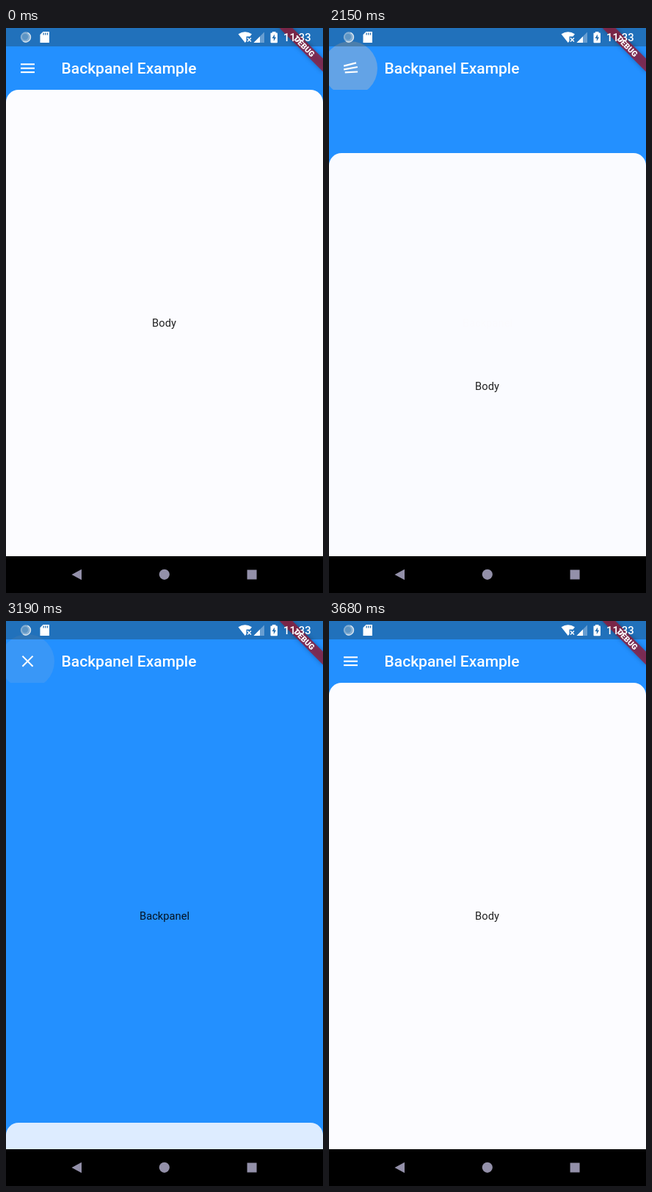
An HTML page with a canvas that plays this animation: 432 by 768 pixels, repeating every 5.7 s.

```html
<!DOCTYPE html>
<html lang="en">
<head>
<meta charset="utf-8">
<title>Backpanel Example</title>
<style>
  html, body { margin: 0; width: 100%; height: 100%; overflow: hidden; background: #000; }
  canvas { display: block; width: 432px; height: 768px; }
</style>
</head>
<body>
<canvas id="stage" width="432" height="768"></canvas>
<script>
const ctx = document.getElementById('stage').getContext('2d');
const W = 432, LOOP = 5700;
const BLUE = '#2390ff', INK = 'rgba(0,0,0,.87)', NAV = '#9390a9';
const TOP = 84, TRAVEL = 598, NAV_TOP = 718;
const OPEN = { ticks: [2020, 2080, 2140, 2190, 2240, 2330, 2420], move: 2054, fade: 2300 };
const CLOSE = { ticks: [3190, 3260, 3330, 3390, 3440, 3540, 3610, 3680], move: 3257, fade: 3530 };
const MOVE_MS = 360;

const clamp = x => Math.min(1, Math.max(0, x));
const ease = x => { x = clamp(x); return x * x * (3 - 2 * x); };

function poly(color, ...pts) {
  ctx.fillStyle = color;
  ctx.beginPath();
  for (let i = 0; i < pts.length; i += 2) ctx.lineTo(pts[i], pts[i + 1]);
  ctx.fill();
}

function disc(color, x, y, r) {
  ctx.fillStyle = color;
  ctx.beginPath();
  ctx.arc(x, y, r, 0, 7);
  ctx.fill();
}

function box(color, x, y, w, h, r = 0) {
  ctx.fillStyle = color;
  ctx.beginPath();
  ctx.roundRect(x, y, w, h, r);
  ctx.fill();
}

function text(str, x, y, size, weight, color, align = 'center') {
  ctx.font = `${weight} ${size}px Roboto, sans-serif`;
  ctx.fillStyle = color;
  ctx.textAlign = align;
  ctx.fillText(str, x, y);
}

function bar(x, y, angle, len, alpha = 1) {
  const dx = Math.cos(angle) * len / 2, dy = Math.sin(angle) * len / 2;
  ctx.strokeStyle = `rgba(255,255,255,${alpha})`;
  ctx.lineWidth = 2.1;
  ctx.beginPath();
  ctx.moveTo(x - dx, y - dy);
  ctx.lineTo(x + dx, y + dy);
  ctx.stroke();
}

// Menu bars turning into a cross.
function menuIcon(p) {
  const cx = 29.5, cy = 54.7, deg = Math.PI / 180;
  const turn = -70 * p * deg, off = 5.4 * (1 - p * p);
  const ox = Math.sin(turn) * off, oy = -Math.cos(turn) * off;
  const len = 19 - 4 * Math.sin(p * Math.PI) + p;
  bar(cx + ox, cy + oy, -45 * Math.pow(p, .6) * deg, len);
  bar(cx, cy, turn, 19, clamp((1 - p) * 2.5));
  bar(cx - ox, cy - oy, -135 * p * p * deg, len);
}

function ripple(t, phase) {
  const start = phase.ticks[0], end = phase.ticks[phase.ticks.length - 1];
  if (t < start || t >= end) return;
  const alpha = .42 * clamp((t - start + 50) / 150) * clamp((end - t) / (end - phase.fade));
  ctx.save();
  ctx.beginPath();
  ctx.rect(0, 0, W, TOP);
  ctx.clip();
  disc(`rgba(188,188,196,${alpha})`, 29, 55, 37);
  ctx.restore();
}

function frontPanel(p, opacity) {
  const y = TOP + TRAVEL * p;
  ctx.save();
  ctx.beginPath();
  ctx.rect(0, 0, W, NAV_TOP);
  ctx.clip();
  ctx.globalAlpha = opacity;
  box('#fcfcff', 0, y, W, 660, 17);
  ctx.globalAlpha = 1;
  text('Body', 215.5, 406 + TRAVEL * p, 14.7, 400, INK);
  ctx.restore();
}

function debugRibbon() {
  ctx.save();
  ctx.translate(W, 0);
  ctx.rotate(Math.PI / 4);
  ctx.shadowColor = 'rgba(0,0,0,.4)';
  ctx.shadowBlur = 6;
  box('rgba(155,22,48,.74)', -42, 29.4, 84, 12.6);
  ctx.shadowColor = 'transparent';
  text('DEBUG', 0, 39.5, 10.7, 900, '#fff');
  ctx.restore();
}

function statusIcons() {
  const white = '#fff', dark = '#2870b0';
  // Sync disc
  disc('rgba(200,215,225,.6)', 27, 12.5, 7.2);
  ctx.strokeStyle = 'rgba(235,242,248,.8)';
  ctx.lineWidth = 1.4;
  ctx.beginPath();
  ctx.arc(27, 12.5, 6.5, -1.2, 2.2);
  ctx.stroke();
  disc('rgba(60,130,185,.55)', 26, 12, 4.2);
  // Memory card
  poly(white, 50.5, 5, 59, 5, 59, 20, 46.5, 20, 46.5, 9);
  for (let i = 0; i < 3; i++) box(dark, 50.5 + i * 2.7, 6.5, 1.3, 3);
  // Wi-Fi without connection
  ctx.fillStyle = white;
  ctx.beginPath();
  ctx.moveTo(325.8, 20);
  ctx.lineTo(316.5, 8.3);
  ctx.quadraticCurveTo(325.8, 2, 335, 8.3);
  ctx.lineTo(332.5, 11.5);
  ctx.lineTo(327.5, 11.5);
  ctx.lineTo(327.5, 18);
  ctx.fill();
  ctx.strokeStyle = white;
  ctx.lineWidth = 1.5;
  ctx.beginPath();
  ctx.moveTo(329, 13.5); ctx.lineTo(334, 18.5);
  ctx.moveTo(334, 13.5); ctx.lineTo(329, 18.5);
  ctx.stroke();
  // Signal
  poly('rgba(255,255,255,.32)', 337.5, 20, 352, 5.5, 352, 20);
  poly(white, 337.5, 20, 346, 11.5, 346, 20);
  // Battery
  box(white, 360.5, 6.5, 9.5, 13.7, 1);
  box(white, 363, 5, 4.5, 2);
  poly(dark, 366, 8.5, 362.5, 14, 364.8, 14, 364.8, 18, 368.2, 12.4, 366, 12.4);
  text('11:33', 378, 18, 14.8, 500, white, 'left');
}

function navBar() {
  box('#000', 0, NAV_TOP, W, 50);
  poly(NAV, 89.5, 743, 103, 735.8, 103, 750.2);
  disc(NAV, 215.8, 742.8, 7.1);
  box(NAV, 328.6, 736.5, 13, 13);
}

function snap(t) {
  const { ticks } = t < CLOSE.ticks[0] ? OPEN : CLOSE;
  return ticks.reduce((last, tick) => tick <= t ? tick : last, 0);
}

function draw(now) {
  const t = snap(now % LOOP);
  const closing = t >= CLOSE.ticks[0];
  const p = ease((t - OPEN.move) / MOVE_MS) - ease((t - CLOSE.move) / MOVE_MS);
  const opacity = 1 - .14 * (closing ? clamp(p * 2) : Math.pow(p, 1.6));

  box(BLUE, 0, 0, W, 768);
  text('Backpanel', 216, 406, 14.7, 400, INK);
  ripple(t, closing ? CLOSE : OPEN);
  frontPanel(p, opacity);
  menuIcon(p);
  text('Backpanel Example', 75.5, 62.3, 21, 500, '#fff', 'left');
  box('rgba(30,50,50,.33)', 0, 0, W, 25);
  debugRibbon();
  statusIcons();
  navBar();
}

const begin = performance.now();
function loop() {
  draw(performance.now() - begin);
  requestAnimationFrame(loop);
}
loop();
</script>
</body>
</html>
```
